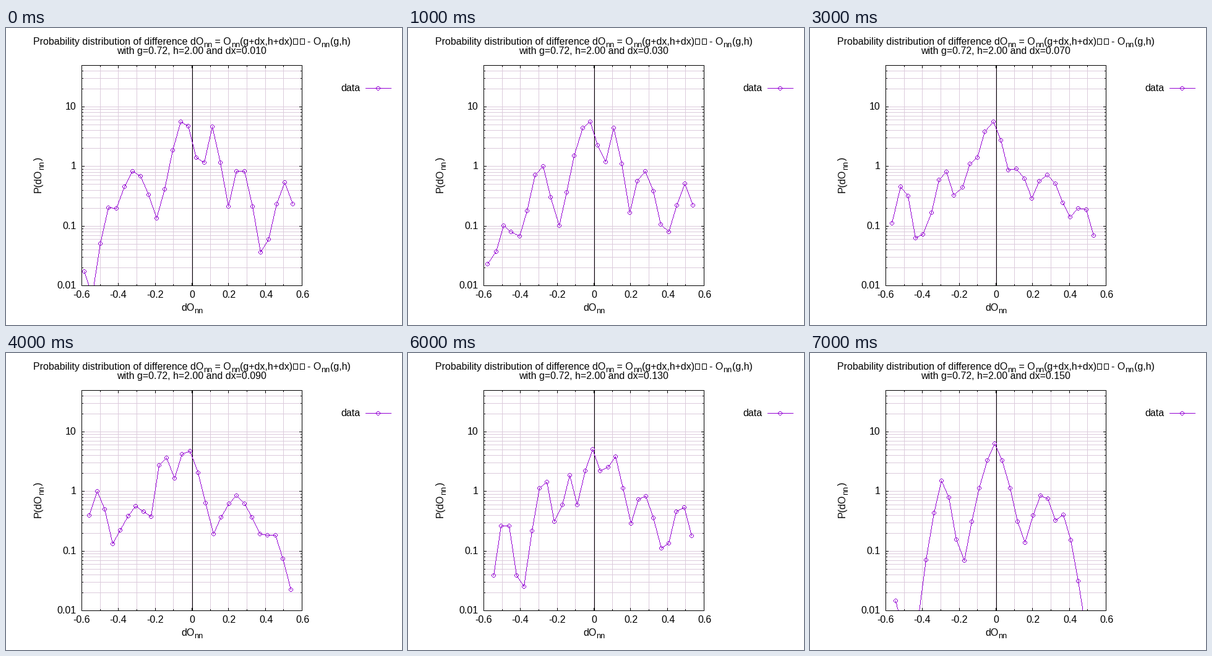
These frames come from a looping animation (640 px wide and 480 px high, 8000 ms). A matplotlib script:

```python
import matplotlib.pyplot as plt
import numpy as np
from matplotlib.animation import FuncAnimation
from matplotlib.patches import Rectangle

W, H, DPI = 640, 480, 80
PX = 72 / DPI                      # one pixel in points
LEFT, RIGHT, TOP, BOTTOM = 122, 478, 60, 416
DECADE = 96.33                     # pixels per power of ten
BINS = 27
VIOLET, GRID = "#9400d3", "#dccbdc"
SIZE, SUB = 16, 12.8
SPAN = range(-3, 4)
RING = np.array([(i, j) for i in SPAN for j in SPAN
                 if 2.8 < np.hypot(i, j) < 3.2])

plt.rcParams["font.family"] = "Liberation Sans"
fig = plt.figure(figsize=(W / DPI, H / DPI), dpi=DPI, facecolor="white")
ax = fig.add_axes([0, 0, 1, 1])
ax.axis("off")
ax.set_xlim(0, W)
ax.set_ylim(H, 0)


def line(x0, y0, x1, y1, color="black", z=3):
    ax.plot([x0, x1], [y0, y1], color=color, lw=PX, zorder=z,
            solid_capstyle="projecting")


def label(x, y, s, size=SIZE, ha="left", angle=0):
    return ax.text(x, y, s, fontsize=size * PX, ha=ha, va="baseline",
                   rotation=angle, rotation_mode="anchor")


def x_pix(v):
    return round(LEFT + (v + 0.6) / 1.2 * (RIGHT - LEFT))


def y_pix(v):
    return round(BOTTOM - (np.log10(v) + 2) * DECADE)


def draw_x_axis():
    for k in range(13):
        v = round(-0.6 + 0.1 * k, 1) + 0
        x, major = x_pix(v), k % 2 == 0
        size = 4 if major else 2
        line(x, TOP, x, BOTTOM, GRID, z=1)
        line(x, BOTTOM, x, BOTTOM - size)
        line(x, TOP, x, TOP + size)
        if major:
            label(x + (1.3 if v >= 0 else 0), 436, f"{v:g}", ha="center")


def draw_y_axis():
    for power in range(-2, 2):
        for m in range(1, 10):
            v = m * 10.0 ** power
            if v > 45:
                break
            y, size = y_pix(v), 4 if m == 1 else 2
            line(LEFT, y, RIGHT, y, GRID, z=1)
            line(LEFT, y, LEFT + size, y)
            line(RIGHT, y, RIGHT - size, y)
            if m == 1:
                label(113.5, y + 5, f"{v:g}", ha="right")


def draw_texts():
    for x, s in ((44, "Probability distribution of difference dO"),
                 (333, " = O"), (378, "(g+dx,h+dx)"), (487.4, "- O"),
                 (524, "(g,h)")):
        label(x, 27, s)
    for x in (319, 364, 509.6):
        label(x, 31, "nn", SUB)
    for x in (464, 475):           # missing-glyph boxes
        ax.add_patch(Rectangle((x, 17), 7, 9, fill=False, lw=PX))

    label(283, 457, "dO")
    label(304.4, 461, "nn", SUB)
    label(57, 266, "P(dO", angle=90)
    label(61, 228.7, "nn", SUB, angle=90)
    label(57, 214.5, ")", angle=90)
    label(541, 102, "data")


def trace(pts):
    """Pixels along a polyline, one per step of its longer side."""
    pts = np.asarray(pts)
    steps = [np.linspace(a, b, int(abs(b - a).max()) + 1)
             for a, b in zip(pts, pts[1:])]
    return np.vstack(steps).round()


def rings(pts):
    return (np.asarray(pts)[:, None] + RING).reshape(-1, 2)


def dots(pixels):
    return ax.plot(*pixels.T, ",", color=VIOLET, zorder=4)[0]


def lobe(centre, top, width=1):
    """A rounded peak falling off on both sides, in pixel rows."""
    return top + 35 * (abs(np.arange(BINS) - centre) / width) ** 1.4


def curve(x0, x1, *lobes):
    """Upper outline of the lobes over even bins from x0 to x1."""
    ys = np.min([lobe(*p) for p in lobes], axis=0)
    return np.column_stack([np.linspace(x0, x1, BINS), ys]).round()


def mean(a, b):
    return ((a + b) / 2).round()


draw_x_axis()
draw_y_axis()
ax.add_patch(Rectangle((LEFT, TOP), RIGHT - LEFT, BOTTOM - TOP, fill=False,
                       lw=PX, zorder=3))
line(301, TOP, 301, BOTTOM, z=2)
draw_texts()
dots(np.vstack([trace([(581, 98), (622, 98)]), rings([(601, 98)])]))

dx01 = curve(126, 463, (0, 394, .7), (3, 291, .7), (6.3, 228, 1.5),
             (12.4, 142), (16, 160, .7), (19.5, 217, .9), (25, 250))
dx05 = curve(131, 456, (1.5, 268, .7), (4, 382, 2), (6.8, 203, .7),
             (13, 144, 1.2), (16, 163, .7), (20.4, 226, 1.3), (25, 254))
dx09 = curve(134, 460, (1.1, 223), (6.2, 247, 2), (9.6, 154, .7),
             (12.6, 151, 1.2), (19, 231, 2), (23.5, 285, 1.2))
dx11 = curve(135, 465, (1.4, 266, .8), (6.7, 213), (12.7, 138, .8),
             (15.6, 198, 1.5), (19.3, 227), (24, 256, 2))
dx13 = curve(138, 458, (1.5, 258, .7), (6.6, 196, .8), (10, 198, .8),
             (13, 156), (15.7, 160, .9), (19.6, 224, 1.2), (24.6, 240))
dx15 = curve(138, 458, (0, 401, .8), (6.2, 202, .85), (13, 147, 1.2),
             (19.4, 224, 1.3), (22, 262, .9))
curves = [dx01, mean(dx01, dx05), dx05, mean(dx05, dx09), dx09,
          dx11, dx13, dx15]

plot = dots(np.empty((0, 2)))
subtitle = label(300, 42, "", ha="center")


def update(i):
    pts = curves[i]
    path = trace(pts)
    seen = np.vstack([path[path[:, 1] <= BOTTOM],
                      rings(pts[pts[:, 1] <= BOTTOM])])
    plot.set_data(*seen.T)
    subtitle.set_text(f"with g=0.72, h=2.00 and dx={0.01 + 0.02 * i:.3f}")
    return plot, subtitle


anim = FuncAnimation(fig, update, frames=len(curves), interval=1000,
                     repeat=True, repeat_delay=0)
plt.show()
```
